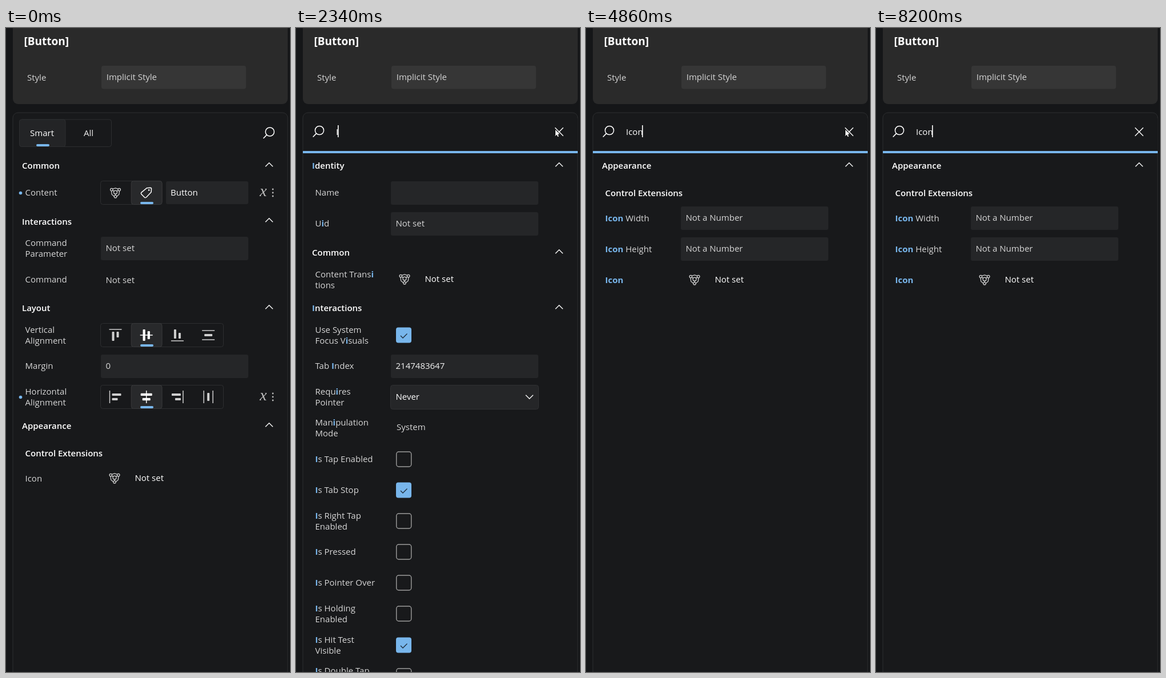
An HTML page with a canvas that plays this animation: 497x1126 px, repeating every 8440 ms.

```html
<!DOCTYPE html>
<html lang="en">
<head>
<meta charset="utf-8">
<title>Property panel search</title>
<style>
html, body { margin: 0; width: 100%; height: 100%; overflow: hidden; background: #17181a; }
canvas { display: block; }
</style>
</head>
<body>
<canvas id="stage" width="497" height="1126"></canvas>
<script>
const ctx = document.getElementById('stage').getContext('2d');
const LOOP = 8440;
const C = {
  page: '#151618', panel: '#18191b', card: '#2a2a2a', cardField: '#363636', field: '#252628',
  line: '#2d2e30', hover: '#28292b', text: '#d6d6d6', icon: '#cfcfcf', white: '#fff', blue: '#78b6ec'
};

// Sections: [title, rows, subtitle]; rows: [label, editor, value, marked]
const iconRow = ['Icon', 'resource'];
const extensions = ['Appearance', [
  ['Icon Width', 'field', 'Not a Number'],
  ['Icon Height', 'field', 'Not a Number'],
  iconRow
], 'Control Extensions'];

const allProps = [
  ['Common', [['Content', 'content', 'Button', true]]],
  ['Interactions', [['Command\nParameter', 'field', 'Not set'], ['Command', 'plain', 'Not set']]],
  ['Layout', [
    ['Vertical\nAlignment', 'align', 'v'],
    ['Margin', 'field', '0'],
    ['Horizontal\nAlignment', 'align', 'h', true]
  ]],
  ['Appearance', [iconRow], 'Control Extensions']
];

const matchI = [
  ['Identity', [['Name', 'field', ''], ['Uid', 'field', 'Not set']]],
  ['Common', [['Content Transi\ntions', 'resource']]],
  ['Interactions', [
    ['Use System\nFocus Visuals', 'check', true],
    ['Tab Index', 'number', '2147483647'],
    ['Requires\nPointer', 'combo', 'Never'],
    ['Manipulation\nMode', 'mode', 'System'],
    ['Is Tap Enabled', 'check', false],
    ['Is Tab Stop', 'check', true],
    ['Is Right Tap\nEnabled', 'check', false],
    ['Is Pressed', 'check', false],
    ['Is Pointer Over', 'check', false],
    ['Is Holding\nEnabled', 'check', false],
    ['Is Hit Test\nVisible', 'check', true],
    ['Is Double Tap\nEnabled', 'check', false]
  ]]
];

const matchIc = [
  ['Common', [['Implicit Style', 'field', 'Not set']]],
  ['Interactions', [['Click Mode', 'combo', 'Release'], ['Key Tip\nVertical Offset', 'field', '0']]],
  ['Layout', [['Vertical Content\nAlignment', 'align', 'v'], ['Vertical\nAlignment', 'align', 'v']]],
  extensions
];

// Latest entry whose time has passed wins
const lists = [[0, allProps, ''], [2340, matchI, 'i'], [4330, matchIc, 'ic'], [4860, [extensions], 'icon']];
const typed = [[0, ''], [2230, 'I'], [4270, 'Ic'], [4780, 'Ico'], [4820, 'Icon']];
const caret = [[0, false], [1650, true], [2070, false], [2230, true], [3390, false],
  [4270, true], [6180, false], [6680, true], [7200, false], [7710, true]];
const pointerPath = [
  [120, 330, 1118], [300, 352, 960], [480, 408, 660], [640, 450, 390], [760, 458, 268],
  [840, 443, 232], [890, 416.5, 212], [950, 422, 201], [1080, 442, 186], [1300, 454, 178],
  [6850, 454, 178], [6940, 454, 188], [6990, 455, 211], [7200, 460, 440], [7690, 467, 890],
  [7900, 473, 1010], [8200, 479, 1128]
];

const current = (steps, t) => steps.filter(s => s[0] <= t).pop();

function pointerAt(t) {
  const i = pointerPath.findIndex(p => p[0] > t);
  if (i < 1) return null;
  const [a, b] = [pointerPath[i - 1], pointerPath[i]];
  const k = (t - a[0]) / (b[0] - a[0]);
  return { x: a[1] + (b[1] - a[1]) * k, y: a[2] + (b[2] - a[2]) * k };
}

// Hover feedback trails the pointer slightly
function hovered(t, x, y, w, h) {
  const p = pointerAt(t - 50);
  return p && p.x >= x && p.x <= x + w && p.y >= y && p.y <= y + h;
}

function box(x, y, w, h, r, fill, stroke, width = 1) {
  ctx.beginPath();
  ctx.roundRect(x, y, w, h, r);
  if (fill) { ctx.fillStyle = fill; ctx.fill(); }
  if (stroke) { ctx.strokeStyle = stroke; ctx.lineWidth = width; ctx.stroke(); }
}

function poly(points, color, width = 1.5) {
  ctx.beginPath();
  points.forEach(([x, y]) => ctx.lineTo(x, y));
  ctx.strokeStyle = color;
  ctx.lineWidth = width;
  ctx.stroke();
}

function circle(x, y, r, fill, stroke, width = 1.5) {
  ctx.beginPath();
  ctx.arc(x, y, r, 0, 7);
  if (fill) { ctx.fillStyle = fill; ctx.fill(); }
  if (stroke) { ctx.strokeStyle = stroke; ctx.lineWidth = width; ctx.stroke(); }
}

// Draws text centred on cy by cap height and returns its width
function text(str, x, cy, color = C.text, weight = 400, size = 15) {
  ctx.font = `${weight} ${size}px "Open Sans", "Noto Sans", sans-serif`;
  ctx.fillStyle = color;
  ctx.fillText(str, x, Math.round(cy + size * 0.357));
  return ctx.measureText(str).width;
}

// Highlights only the first match in a label
function label(str, x, cy, query, color, weight) {
  const lines = str.split('\n');
  let pending = query;
  lines.forEach((line, n) => {
    const y = cy + (n - (lines.length - 1) / 2) * 19.6;
    const at = pending ? line.toLowerCase().indexOf(pending) : -1;
    if (at < 0) { text(line, x, y, color, weight); return; }
    const end = at + pending.length;
    let left = x + text(line.slice(0, at), x, y, color, weight);
    left += text(line.slice(at, end), left, y, C.blue, 700);
    text(line.slice(end), left, y, color, weight);
    pending = '';
  });
}

function chevron(x, y, dir) {
  poly([[x - 6.5, y + 3.3 * dir], [x, y - 3.3 * dir], [x + 6.5, y + 3.3 * dir]], '#f0f0f0');
}

function magnifier(x, y) {
  circle(x, y, 7.6, null, C.white);
  poly([[x - 5.4, y + 5.4], [x - 11.3, y + 11.5]], C.white, 1.6);
}

function resourceIcon(x, y) {
  const nodes = [[-6.7, -5.4], [6.7, -5.4], [0, 6.8]];
  const hub = [0, -0.8];
  ctx.save();
  ctx.translate(x, y);
  poly([[-4.6, -6.6], [0, -8], [4.6, -6.6]], C.icon, 1.3);
  poly([[-7, -3], [-6.3, 3], [-2.2, 6.4]], C.icon, 1.3);
  poly([[7, -3], [6.3, 3], [2.2, 6.4]], C.icon, 1.3);
  nodes.forEach(n => poly([n, hub], C.icon, 1.3));
  nodes.forEach(n => circle(n[0], n[1], 2.2, C.panel, C.icon, 1.3));
  circle(hub[0], hub[1], 3, C.panel, C.icon, 1.3);
  ctx.restore();
}

function tagIcon(x, y) {
  ctx.save();
  ctx.translate(x, y);
  ctx.strokeStyle = C.white;
  ctx.lineWidth = 1.5;
  ctx.stroke(new Path2D('M1 -8.3L7 -8.7Q9 -8.7 9 -6.7L8.6 -1L0 8Q-1.7 9.3 -3.2 8L-8.6 2.6Q-9.8 1 -8.6 -.4Z'));
  circle(4.6, -4.6, 1.3, C.white);
  ctx.restore();
}

// Alignment glyphs are defined vertically; the horizontal set swaps the axes
function alignIcon(kind, x, y, axis, color) {
  const part = (px, py, w, h, r = 1) => axis === 'v'
    ? box(x + px, y + py, w, h, r, color)
    : box(x + py, y + px, h, w, r, color);
  const rule = at => part(-11, at - 0.75, 22, 1.5, 0);
  if (kind === 0) { rule(-10); part(-6, -6, 4, 16); part(2, -6, 4, 10); }
  if (kind === 1) { rule(0); part(-6.2, -10, 4.2, 20); part(2, -7, 4.2, 14); }
  if (kind === 2) { rule(10); part(-6, -10, 4, 16); part(2, -4, 4, 10); }
  if (kind === 3) { rule(-8); rule(8); part(-7, -2, 14, 4); }
}

function segments(cy, count) {
  const cell = 53.75;
  box(165.5, cy - 20.5, cell * count, 41, 4, null, C.line);
  box(165.5 + cell, cy - 20.5, cell, 41, 4, C.hover, '#38393b');
  box(235, cy + 16, 23, 4, 2, C.blue);
}

const editors = {
  field(cy, value, color) {
    box(166, cy - 20, 258, 41, 3, C.field);
    text(value, 174.5, cy, color);
  },
  number(cy, value) { editors.field(cy, value, '#f2f2f2'); },
  plain(cy, value) { text(value, 174.5, cy + 0.7); },
  mode(cy, value) { text(value, 176, cy - 1); },
  content(cy, value) {
    segments(cy, 2);
    resourceIcon(191.5, cy);
    tagIcon(245.5, cy);
    box(280, cy - 20, 144, 40, 3, C.field);
    text(value, 288, cy, C.white);
  },
  align(cy, axis) {
    segments(cy, 4);
    for (let k = 0; k < 4; k++) alignIcon(k, 191.5 + k * 54.2, cy, axis, k === 1 ? C.white : C.icon);
  },
  resource(cy) {
    resourceIcon(190, cy - 1);
    text('Not set', 225.5, cy - 1, C.white);
  },
  check(cy, on) {
    if (on) {
      box(175, cy - 13.5, 27, 27, 4, C.blue);
      poly([[183, cy + 1], [187, cy + 5], [194.5, cy - 2.5]], '#1d2b38', 1.3);
    } else {
      box(175.75, cy - 13, 26, 26, 4, null, '#9c9c9c', 1.4);
    }
  },
  combo(cy, value) {
    box(165.5, cy - 20.5, 259, 42, 4, C.field, '#303133');
    text(value, 174.5, cy, C.white);
    chevron(408.5, cy, -1);
  }
};

function markers(cy) {
  circle(25.5, cy + 0.5, 2.8, C.blue);
  ctx.font = 'italic 28px "Liberation Serif", serif';
  ctx.fillStyle = '#bdbdbd';
  ctx.fillText('x', 444, Math.round(cy + 6));
  [-6, 0, 6].forEach(d => circle(467, cy + d, 1.4, '#bdbdbd'));
}

function propertyList(sections, query, t) {
  let y = 241;
  for (const [title, rows, subtitle] of sections) {
    const top = Math.round(y) - 22;
    if (hovered(t, 439, top, 43, 41)) box(439, top, 43, 41, 3, '#252628');
    label(title, 28, y, query, C.white, 600);
    chevron(460.5, Math.round(y) - 2, 1);
    if (subtitle) {
      text(subtitle, 33.5, y + 48, C.white, 600);
      y += 45;
    }
    y += 47;
    for (const [name, editor, value, marked] of rows) {
      const cy = Math.round(y);
      label(name, 33.5, cy, query);
      editors[editor](subtitle && editor === 'field' ? cy - 1 : cy, value);
      if (marked) markers(cy);
      y += 54.15;
    }
    y += 43.3 - 47;
  }
}

function header() {
  box(12, -10, 481, 143, 9, C.card);
  text('[Button]', 31.5, 23, C.white, 700, 19);
  text('Style', 37, 87);
  box(167, 66, 253, 40.5, 4, C.cardField);
  text('Implicit Style', 175.7, 86);
}

function tabs(t) {
  box(23.5, 160, 161, 47.5, 4, null, C.line);
  box(23.5, 160, 80.5, 47.5, 4, '#232426', C.line);
  text('Smart', 42, 184, C.white);
  text('All', 136, 184, '#f0f0f0');
  box(53, 203, 23, 4, 2, C.blue);
  if (hovered(t, 441, 167, 36, 32)) box(441, 167.5, 36, 32, 4, '#2b2c2e');
  magnifier(461.7, 181.5);
}

function searchBar(t) {
  ctx.fillStyle = C.panel;
  ctx.fillRect(13, 158, 480, 60);
  magnifier(41, 179);
  const query = current(typed, t)[1];
  if (query) text(query, 70, 181.4, C.white);
  else text('Search', 70, 181.4, '#c4c4c4');
  if (current(caret, t)[1]) {
    const width = query ? ctx.measureText(query).width : 0;
    ctx.fillStyle = C.white;
    ctx.fillRect(Math.max(70, Math.floor(69.3 + width)), 170, 1.6, 21);
  }
  if (t >= 6850 && hovered(t, 441, 166, 36, 32)) box(441, 165.5, 36, 32, 5, '#2d2e30');
  poly([[453.3, 174.3], [467.7, 188.7]], C.white, 1.4);
  poly([[453.3, 188.7], [467.7, 174.3]], C.white, 1.4);
  ctx.fillStyle = C.blue;
  ctx.fillRect(12, 215, 481, 4);
}

function pointer(p) {
  ctx.save();
  ctx.translate(p.x, p.y);
  const arrow = new Path2D('M0 0V10.6L2.4 8.4L4.1 12.3L5.8 11.6L4.2 7.8L7.4 7.6Z');
  ctx.strokeStyle = '#0b0b0c';
  ctx.lineWidth = 1.2;
  ctx.stroke(arrow);
  ctx.fillStyle = C.white;
  ctx.fill(arrow);
  ctx.restore();
}

function draw(t) {
  ctx.fillStyle = C.page;
  ctx.fillRect(0, 0, 497, 1126);
  header();
  box(12, 148, 481, 1000, 9, C.panel, C.line);
  const [, sections, query] = current(lists, t);
  propertyList(sections, query, t);

  const opened = t < 1460 ? 0 : Math.min(1, (Math.floor((t - 1460) / 63) + 1) / 4);
  if (opened < 1) tabs(t);
  if (opened > 0) {
    ctx.globalAlpha = opened;
    searchBar(t);
    ctx.globalAlpha = 1;
  }
  const p = pointerAt(t);
  if (p) pointer(p);
}

function tick() {
  draw(performance.now() % LOOP);
  requestAnimationFrame(tick);
}
tick();
</script>
</body>
</html>
```
